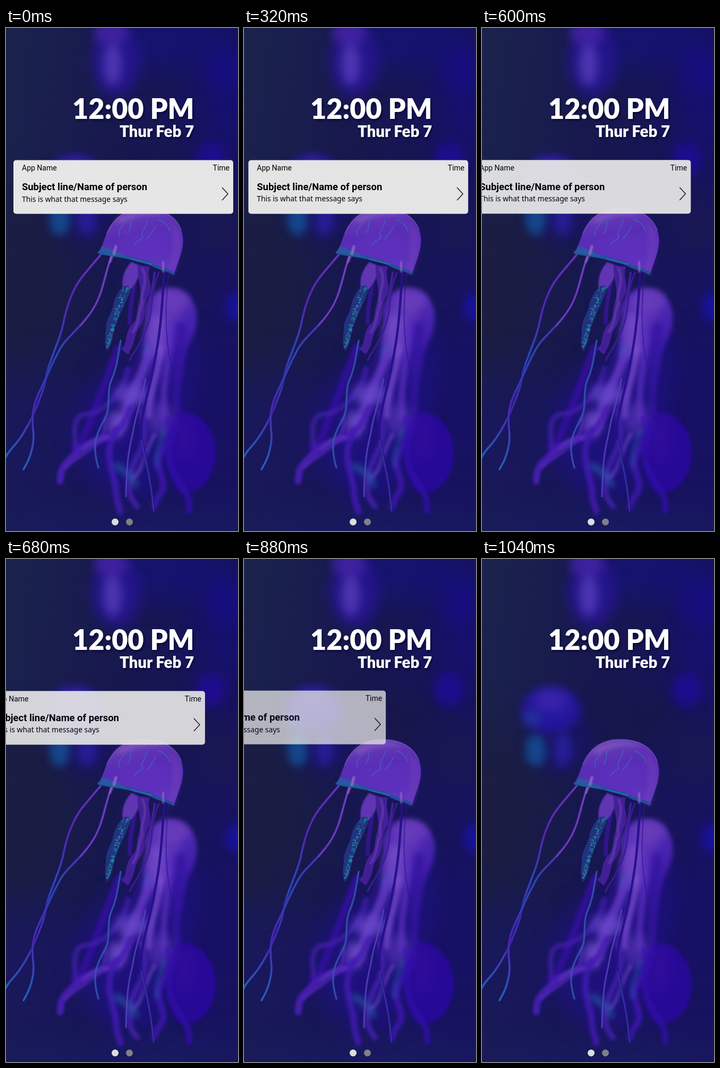
An HTML page that plays this animation: 437 by 946 pixels, repeating every 2.84 s.

```html
<!DOCTYPE html>
<html lang="en">
<head>
<meta charset="utf-8">
<title>Notification swipe</title>
<style>
  html, body { margin: 0; width: 100%; height: 100%; overflow: hidden; background: #17194f; }
  svg { display: block; width: 100%; height: 100%; }
  .clock { font-family: Lato, sans-serif; font-weight: 900; fill: #fff; text-anchor: end; }
  .ui { font-family: Roboto, sans-serif; font-size: 14px; }
  .subject { font-family: Roboto, sans-serif; font-size: 18.4px; font-weight: 700; }
  .message { font-family: "Noto Sans", sans-serif; font-size: 13.8px; }
</style>
</head>
<body>
<svg viewBox="0 0 437 946" preserveAspectRatio="none">
  <defs>
    <linearGradient id="sea" x2="1" y2=".25">
      <stop offset="0" stop-color="#1b234c"/>
      <stop offset=".5" stop-color="#17184e"/>
      <stop offset="1" stop-color="#17135f"/>
    </linearGradient>
    <linearGradient id="bell" x1=".3" x2=".6" y2="1">
      <stop offset="0" stop-color="#6c40b6"/>
      <stop offset=".4" stop-color="#582cb4"/>
      <stop offset="1" stop-color="#5f33c0"/>
    </linearGradient>
    <linearGradient id="trail" gradientUnits="userSpaceOnUse" x1="190" y1="430" x2="40" y2="830">
      <stop offset="0" stop-color="#6238ac"/>
      <stop offset=".25" stop-color="#5128a4"/>
      <stop offset=".46" stop-color="#2c48a8"/>
      <stop offset=".58" stop-color="#3040b0"/>
      <stop offset=".74" stop-color="#4a26ac"/>
      <stop offset="1" stop-color="#1d68a8"/>
    </linearGradient>
    <linearGradient id="back" x2="0" y2="1">
      <stop offset="0" stop-color="#5a30bc"/>
      <stop offset=".45" stop-color="#3f1bac"/>
      <stop offset="1" stop-color="#2e109c" stop-opacity="0"/>
    </linearGradient>
    <filter id="shade" x="-10%" y="-30%" width="120%" height="170%">
      <feDropShadow dx="2" dy="3" stdDeviation="2" flood-color="#05062c" flood-opacity=".65"/>
    </filter>
  </defs>
  <rect width="437" height="946" fill="url(#sea)"/>
  <g id="scene"></g>
  <g class="clock" filter="url(#shade)">
    <text x="354.5" y="171" font-size="52">12:00 PM</text>
    <text x="354" y="205" font-size="29.300">Thur Feb 7</text>
  </g>
  <circle cx="205.5" cy="929" r="6.5" fill="#dcdce0"/>
  <circle cx="232.5" cy="929" r="6.5" fill="#808088"/>
  <g id="card">
    <rect x="14" y="248.5" width="414" height="101" rx="5" fill="#e6e6e6"/>
    <text class="ui" x="30" y="268">App Name</text>
    <text class="ui" x="421" y="268" text-anchor="end">Time</text>
    <text class="subject" x="30" y="305">Subject line/Name of person</text>
    <text class="message" x="30" y="326.500">This is what that message says</text>
    <path d="M407 300L418 312L407 324" fill="none" stroke="#111" stroke-width="1.4"/>
  </g>
</svg>
<script>
const NS = 'http://www.w3.org/2000/svg';
const scene = document.getElementById('scene');
const card = document.getElementById('card');

function add(tag, attrs, blur = 0) {
  const el = document.createElementNS(NS, tag);
  for (const key in attrs) el.setAttribute(key, attrs[key]);
  if (blur) el.style.filter = `blur(${blur}px)`;
  scene.append(el);
}
const blob = (cx, cy, rx, ry, fill, opacity, blur) =>
  add('ellipse', { cx, cy, rx, ry, fill, opacity }, blur);
const shape = (d, fill, opacity = 1, blur = 0) => add('path', { d, fill, opacity }, blur);
const strand = (d, stroke, width, opacity = 1, blur = 0) =>
  add('path', { d, stroke, opacity, fill: 'none', 'stroke-width': width, 'stroke-linecap': 'round' }, blur);

// Smooth path through a chain of points.
function curve(...pts) {
  let d = `M${pts[0]}`;
  for (let i = 1; i < pts.length - 1; i++) {
    const [x, y] = pts[i], [nx, ny] = pts[i + 1];
    d += `Q${x} ${y} ${(x + nx) / 2} ${(y + ny) / 2}`;
  }
  return d + `L${pts[pts.length - 1]}`;
}

function drawWater() {
  blob(10, 480, 110, 170, '#1b1c40', .8, 40);
  blob(310, 25, 110, 55, '#15127a', .7, 25);
  blob(420, 130, 60, 100, '#150f78', .6, 30);
  blob(60, 780, 150, 130, '#191564', .6, 40);
  blob(420, 690, 60, 110, '#170f6a', .5, 30);
  blob(230, 940, 260, 40, '#191b62', .8, 25);
  blob(300, 300, 80, 50, '#171747', .7, 25);
  blob(400, 370, 50, 60, '#1a1a4e', .7, 25);
  blob(208, 62, 46, 66, '#271594', .85, 12);
  blob(198, 10, 32, 22, '#4423a4', .85, 9);
  blob(201, 68, 17, 40, '#533bb8', .85, 9);
  blob(410, 80, 32, 44, '#180d8c', .6, 16);
  blob(386, 246, 28, 32, '#1f0c94', .9, 10);
  blob(434, 525, 20, 28, '#1812a0', .9, 9);
  blob(150, 345, 55, 55, '#1a126c', .7, 16);
  blob(130, 284, 56, 42, '#2516a0', .95, 9);
  blob(130, 266, 34, 22, '#3c25ac', .8, 10);
  blob(95, 300, 18, 16, '#20389a', .7, 8);
  blob(101, 360, 19, 30, '#15488e', .95, 8);
  blob(152, 358, 17, 32, '#2820a0', .85, 9);
}

function drawBackJelly() {
  blob(235, 760, 95, 125, '#220f94', .6, 24);
  blob(335, 640, 30, 90, '#1f1090', .5, 18);
  shape('M318 722C365 715 397 755 395 803C393 850 360 882 326 872C300 850 300 760 318 722Z', '#28099a', .95, 3);
  blob(335, 770, 22, 45, '#360f9c', .6, 12);
  shape('M261 530C270 500 292 486 315 490C345 494 362 522 359 550C358 578 344 590 339 615L326 715L244 722C262 650 252 600 266 552Z', 'url(#back)', .95, 4);
  blob(313, 512, 32, 20, '#6c3fb8', .75, 7);
  blob(300, 535, 30, 26, '#6a3fbe', .6, 9);
  blob(285, 578, 22, 42, '#7a50c8', .75, 8);
  blob(266, 608, 11, 14, '#4766c4', .55, 6);
  strand('M330 560C333 610 316 660 322 718', '#3415a0', 13, .8, 4);
  strand('M308 560C312 620 292 660 298 735', '#5a30c0', 11, .8, 4);
  strand('M292 600C288 650 272 670 268 730', '#7a4cd0', 11, .85, 4);
  strand('M270 610C252 665 230 695 215 755', '#6238c4', 18, .85, 4);
  strand('M255 600C245 640 228 660 222 690', '#2b1290', 9, .7, 3);
  strand('M212 600C196 640 180 690 150 760S138 790 128 788', '#330f9e', 13, .9, 3);
  strand('M230 640C220 690 180 725 152 726S128 760 132 788', '#4420ac', 9, .75, 3);
  blob(238, 690, 34, 20, '#6a4acc', .75, 9);
  blob(290, 735, 26, 32, '#6038c0', .6, 10);
  blob(208, 745, 17, 26, '#7450cc', .75, 8);
  strand('M236 715C205 790 172 762 137 795S105 825 102 852', '#481fb2', 13, .9, 2.5);
  strand('M196 770C175 768 160 778 146 793', '#6a40c4', 6, .6, 3);
  strand('M188 735C193 782 140 800 112 826', '#4f26b4', 7, .8, 2.5);
  strand('M207 755C180 810 205 835 207 870S215 895 215 910', '#411ab0', 12, .85, 3);
  strand('M254 720C276 785 242 800 236 835S230 880 247 900', '#4722b0', 10, .8, 3);
  strand('M225 760C240 790 222 805 212 830', '#1f0f84', 8, .6, 4);
  strand('M305 735C325 786 274 792 290 835S286 870 279 900', '#3d16ae', 12, .85, 3);
  strand('M318 745C292 810 314 835 331 862S344 887 345 908', '#300ea4', 11, .9, 3);
  strand('M280 765C260 795 260 830 241 845', '#6c48c8', 7, .65, 3);
  strand('M298 755C292 785 279 800 284 824', '#295aab', 7, .55, 4);
  strand('M208 824C225 832 239 845 243 858', '#2870ad', 13, .5, 6);
  strand('M262 800C268 820 258 850 262 880', '#1c0f80', 8, .6, 4);
}

function drawTrail(d) {
  strand(d, '#24127c', 6, .6, 1);
  strand(d, 'url(#trail)', 3.6);
}

function drawTrails() {
  drawTrail(curve([178, 427], [160, 448], [135, 478], [119, 512], [110, 545], [105, 570], [92, 605],
    [77, 645], [73, 672], [62, 702], [47, 738], [25, 775], [5, 797], [-2, 810]));
  drawTrail(curve([198, 430], [188, 462], [178, 500], [165, 529], [140, 560], [108, 592], [96, 614],
    [84, 638], [71, 668], [57, 696], [50, 722], [50, 748], [53, 775], [45, 808], [33, 830]));
  strand('M198 430C190 452 187 476 178 500S155 544 140 560', '#7748b8', 2.5, .75, .5);
  strand('M207 413C203 425 199 430 196 440', '#8a60bc', 4, .85, 1);
  strand('M216 588C210 621 209 640 197 666C189 690 199 715 184 739C168 768 162 786 174 827', '#3157ad', 3.5, .85, .7);
  strand('M263 660C254 705 245 725 240 755S228 790 226 881', '#5640bc', 3, .85, .7);
  strand('M298 460C294 520 292 570 279 631C270 683 253 728 254 766C258 800 274 835 278 908', '#26108a', 4.5, .95, .6);
  strand('M255 775C264 820 272 845 278 908', '#393fa0', 2.5, .75, .5);
  strand('M288 460C268 505 282 535 257 582S242 605 233 625', '#3a1c98', 3.5, .9, .5);
  strand('M280 460C275 500 268 520 265 545', '#4721a0', 4, .9, .5);
  strand('M306 463C299 530 300 583 311 635S316 680 318 710', '#2e1490', 2, .65, .5);
}

function drawArms() {
  strand('M243 468C240 500 232 523 233 555', '#341590', 8, .9, 1);
  shape('M236 440C222 455 216 475 221 494C235 497 245 480 250 466L257 449Z', '#5f35b2', 1, 1);
  shape('M248 446C246 472 257 487 252 510C243 537 251 547 235 560C222 580 229 600 216 602C225 610 230 619 233 608C245 590 239 579 254 559C267 536 254 524 270 501C277 481 264 469 271 449Z', '#45209a', .97, .7);
  strand('M257 452C270 480 251 498 257 518C247 540 253 551 239 572', '#6540b0', 4, .8, 1.5);
  shape('M220 487C229 482 236 486 234 495C225 520 216 534 210 551C199 569 205 588 191 607C184 598 187 583 188 569C187 551 196 542 201 526C204 508 211 498 220 487Z', '#22327e');
  let seed = 7;
  const rand = () => (seed = seed * 16807 % 2147483647) / 2147483647;
  for (let i = 0; i < 125; i++) {
    const u = rand();
    const x = 228 - 38 * Math.pow(u, .8) + (rand() - .5) * (14 - 9 * u);
    const fill = rand() < .65 ? '#208f9c' : '#2770a4';
    blob(x, 488 + 113 * u, .6 + rand() * 1.2, .7 + rand(), fill, .85, 0);
  }
}

function drawBell() {
  shape('M173 423C181 414 183 402 190 385C202 355 228 338 260 339C291 338 318 350 329 377C336 395 334 411 328 429L316 464C302 456 291 456 279 450C263 441 248 441 234 435C213 429 190 430 173 423Z', 'url(#bell)');
  shape('M205 365C226 341 272 338 304 354C276 348 240 352 222 366Z', '#9068c0', .55, 4);
  blob(258, 402, 46, 22, '#6433c4', .4, 12);
  shape('M304 363C333 370 335 403 316 464L303 457C316 425 321 394 304 363Z', '#7644b4', .45, 4);
  strand('M190 386C203 356 228 340 260 340S320 352 330 380', '#7c58b8', 1.5, .6, .6);
  strand('M175 422C195 428 211 426 235 433C254 440 267 438 281 448C293 454 302 453 315 461', '#1e4f98', 5);
  shape('M174 423L181 410L209 420L235 435L203 429Z', '#23619f', .75, 1);
  strand('M235 434L275 444', '#2480aa', 2, .7);
  const veins = [
    'M239 357C230 368 239 374 229 386',
    'M266 360C264 376 252 386 257 391S244 400 242 408',
    'M224 365C216 377 211 380 213 391',
    'M287 361C297 363 304 371 308 381',
    'M282 373C275 383 273 390 265 396',
    'M250 346C262 340 275 345 285 352'
  ];
  for (const d of veins) strand(d, '#4263ba', 2, .75, .4);
  strand('M207 411L203 425', '#a276cb', 5, .7, 1);
  strand('M296 440L296 458', '#a06bc9', 4, .65, 1);
}

drawWater();
drawBackJelly();
drawTrails();
drawArms();
drawBell();

const LOOP = 2840, STEP = 40, SLIDE = 1000;
const mix = (a, b, s) => 3 * (1 - s) * (1 - s) * s * a + 3 * (1 - s) * s * s * b + s * s * s;

// Accelerating bezier curve (.8, 0, .85, .243).
function ease(p) {
  let lo = 0, hi = 1;
  for (let i = 0; i < 24; i++) {
    const mid = (lo + hi) / 2;
    if (mix(.8, .85, mid) < p) lo = mid; else hi = mid;
  }
  return mix(0, .243, lo);
}

function render(ms) {
  const t = Math.floor((ms % LOOP) / STEP) * STEP;
  const p = Math.min(1, Math.max(0, (t - STEP) / SLIDE));
  const k = p > 0 ? ease(p) : 0;
  card.setAttribute('transform', `translate(${-428 * k} ${-2.5 * k})`);
  card.setAttribute('opacity', 1 - .66 * k);
  card.setAttribute('visibility', p < 1 ? 'visible' : 'hidden');
}

let start;
function tick(now) {
  start ??= now;
  render(now - start);
  requestAnimationFrame(tick);
}
render(0);
requestAnimationFrame(tick);
</script>
</body>
</html>
```
